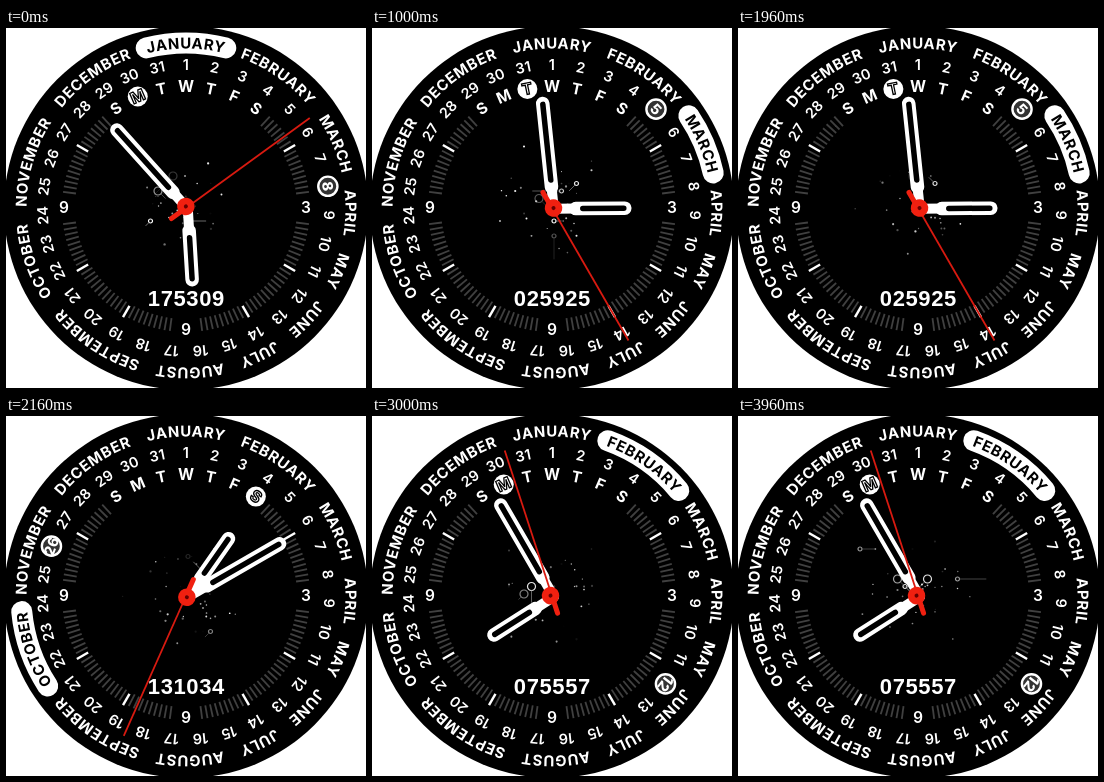
An HTML page for the animation above (4000 ms loop, 360x360 px).

```html
<!DOCTYPE html>
<html lang="en">
<head>
<meta charset="utf-8">
<title>Watch face</title>
<style>
  html, body { margin: 0; width: 100%; height: 100%; overflow: hidden; background: #fff; }
  svg { display: block; width: 100vw; height: 100vh; }
  text { fill: #fff; text-anchor: middle; font-family: Inter, Roboto, sans-serif; font-weight: 600; }
  .month { font-size: 15px; font-weight: 700; letter-spacing: .6px; }
  .day { font-size: 14.5px; letter-spacing: .2px; }
  .week { font-size: 15.5px; font-weight: 700; }
  .num { font-size: 15.5px; }
  .clock { font: bold 22px "Liberation Sans", Arial, sans-serif; letter-spacing: .6px; }
</style>
</head>
<body>
<svg viewBox="0 0 360 360">
  <defs><path id="ring" d="M0 159.5A159.5 159.5 0 0 1 0 -159.5A159.5 159.5 0 0 1 0 159.5"/></defs>
  <circle cx="180" cy="180" r="182"/>
  <g id="face" transform="translate(180 180)"></g>
  <g id="sparks"></g>
  <g id="front" transform="translate(180 180)"></g>
</svg>
<script>
const LOOP = 4000, STEP = LOOP / 60;
const MONTHS = ["JANUARY", "FEBRUARY", "MARCH", "APRIL", "MAY", "JUNE", "JULY",
  "AUGUST", "SEPTEMBER", "OCTOBER", "NOVEMBER", "DECEMBER"];
const SCENES = [
  { time: "175309", month: 0, day: 8, week: 1 },
  { time: "025925", month: 2, day: 5, week: 2 },
  { time: "131034", month: 9, day: 26, week: 6 },
  { time: "075557", month: 1, day: 12, week: 1 }
];
const [face, sparks, front] = ["face", "sparks", "front"].map(id => document.getElementById(id));

function set(el, attrs) {
  for (const k in attrs) el.setAttribute(k, attrs[k]);
}
function add(parent, tag, attrs, text) {
  const el = document.createElementNS("http://www.w3.org/2000/svg", tag);
  set(el, attrs);
  if (text !== undefined) el.textContent = text;
  return parent.appendChild(el);
}
function polar(r, deg) {
  const a = deg * Math.PI / 180;
  return [r * Math.sin(a), -r * Math.cos(a)];
}
function ray(parent, deg, from, to, color, width, cap = "round") {
  return add(parent, "line", { y1: -from, y2: -to, stroke: color, "stroke-width": width,
    "stroke-linecap": cap, transform: `rotate(${deg})` });
}
function label(cls, r, deg, text) {
  return add(face, "text", { class: cls, y: 5.3 - r, transform: `rotate(${deg})` }, text);
}

// Ticks leave room for the weekdays and the numerals
for (let a = 42.5; a < 320; a += 2.5) {
  if (Math.abs((a + 45) % 90 - 45) < 7) continue;
  if (a % 30) ray(face, a, 111, 124, "#404040", 1.8, "butt");
  else ray(face, a, 113, 126, "#fff", 2.4, "butt");
}
add(face, "text", { class: "num", x: 120, y: 5 }, "3");
add(face, "text", { class: "num", x: -122, y: 5 }, "9");
label("num", 120, 180, "6");

// Highlights sit below the labels
const dayAngle = d => (d - 1) * 360 / 31, weekAngle = w => (w - 3) * 11.7;
const pill = add(face, "path", { fill: "none", stroke: "#fff", "stroke-width": 21, "stroke-linecap": "round" });
const dayRing = add(face, "circle", { r: 9.6, fill: "#333", stroke: "#fff", "stroke-width": 2.4 });
const weekDisc = add(face, "circle", { r: 10, fill: "#fff" });
const days = Array.from({ length: 31 }, (_, i) => label("day", 143.5, dayAngle(i + 1), i + 1));
const weeks = [..."SMTWTFS"].map((c, i) => label("week", 121.5, weekAngle(i), c));

// Month names share the ring with equal gaps
const months = MONTHS.map(name => {
  const el = add(face, "text", { class: "month" });
  add(el, "textPath", { href: "#ring", startOffset: "50%" }, name);
  return { el, arc: el.getComputedTextLength() / 159.5 * 180 / Math.PI };
});
const gap = (360 - months.reduce((s, m) => s + m.arc, 0)) / 12;
let edge = -months[0].arc / 2;
for (const m of months) {
  m.mid = edge + m.arc / 2;
  set(m.el, { transform: `rotate(${m.mid})` });
  edge += m.arc + gap;
}

// Hands
const clock = add(front, "text", { class: "clock", x: 0.3, y: 97.7 });
const pivot = add(front, "g", { transform: "translate(1.8 .8)" });
function makeHand(len) {
  const g = add(pivot, "g", {});
  ray(g, 0, 0, 24, "#fff", 10);
  ray(g, 0, 22, len - 7, "#fff", 13.5);
  ray(g, 0, 29, len - 8, "#000", 5.5);
  return g;
}
const hour = makeHand(78), minute = makeHand(113);
const second = add(front, "g", {});
ray(second, 0, 0, 153, "#d81a10", 1.8, "butt");
ray(second, 0, 0, -18, "#f02010", 5);
// The hub sits slightly off the axis and turns with the hand
const hub = add(second, "g", { transform: "translate(-1.3 -.8)" });
add(hub, "circle", { r: 8.8, fill: "#f02010" });
add(hub, "circle", { r: 2, fill: "#600" });

function showScene(s) {
  const m = months[s.month];
  const [from, to] = [-1, 1].map(k => polar(165, m.mid + k * m.arc / 2));
  set(pill, { d: `M${from}A165 165 0 0 1 ${to}` });
  months.forEach((o, i) => { o.el.style.fill = i === s.month ? "#000" : "#fff"; });

  const [dx, dy] = polar(143.5, dayAngle(s.day));
  set(dayRing, { cx: dx, cy: dy });
  days.forEach((el, i) => { el.style.fontWeight = i === s.day - 1 ? 800 : 600; });

  const [wx, wy] = polar(121.5, weekAngle(s.week));
  set(weekDisc, { cx: wx, cy: wy });
  weeks.forEach((el, i) => set(el, { stroke: i === s.week ? "#000" : "none", "stroke-width": 1.3 }));

  const [h, min, sec] = s.time.match(/../g).map(Number);
  set(hour, { transform: `rotate(${h % 12 * 30 + min / 2})` });
  set(minute, { transform: `rotate(${min * 6})` });
  set(second, { transform: `rotate(${sec * 6})` });
  clock.textContent = s.time;
}

// Circuit sparks: dots drift and rings grow traces on a 7.5 px grid
let seed = 71;
function rnd(lo = 0, hi = 1) {
  seed = seed * 16807 % 2147483647;
  return lo + seed / 2147483647 * (hi - lo);
}
const cell = () => Math.floor(rnd(0, 8) + rnd(0, 8)) * 7.5;
const clamp = v => Math.max(0, Math.min(1, v));

function makeSpark(i) {
  const ring = i % 9 === 0, g = add(sparks, "g", {});
  const s = { g, ring, x: 122 + cell(), y: 118 + cell(), heading: Math.floor(rnd(0, 8)) * 45,
    life: ring ? rnd(600, 1000) : rnd(450, 900), alpha: rnd(0.4, 1) };
  s.start = rnd(-s.life, LOOP);
  if (ring) {
    s.r = rnd() < 0.5 ? 4 : 2;
    s.len = s.r + rnd(0, 30);
    add(g, "circle", { r: s.r, fill: "none", stroke: "#fff", "stroke-width": 1.2 });
    s.trace = ray(g, s.heading, s.r, s.r, "#888", 0.8, "butt");
  } else {
    add(g, "circle", { r: rnd(0.5, 1.2), fill: "#fff" });
  }
  return s;
}
const all = Array.from({ length: 234 }, (_, i) => makeSpark(i));

function drawSpark(s, t) {
  const p = clamp((t - s.start) / s.life), ease = 1 - (1 - p) ** 2;
  const [dx, dy] = s.ring ? [0, 0] : polar(7.5 * ease, s.heading);
  set(s.g, { transform: `translate(${s.x + dx} ${s.y + dy})`,
    opacity: s.alpha * clamp(Math.min(p, 1 - p) * 5) });
  if (s.ring) set(s.trace, { y2: -(s.r + (s.len - s.r) * ease) });
}

let current = -1;
function draw(ms) {
  const t = ms % LOOP, scene = Math.floor(t / 1000);
  if (scene !== current) showScene(SCENES[current = scene]);
  const held = Math.floor(t / STEP) * STEP;
  all.forEach(s => drawSpark(s, held));
}
const begin = performance.now();
function tick() {
  draw(performance.now() - begin);
  requestAnimationFrame(tick);
}
draw(0);
requestAnimationFrame(tick);
</script>
</body>
</html>
```
